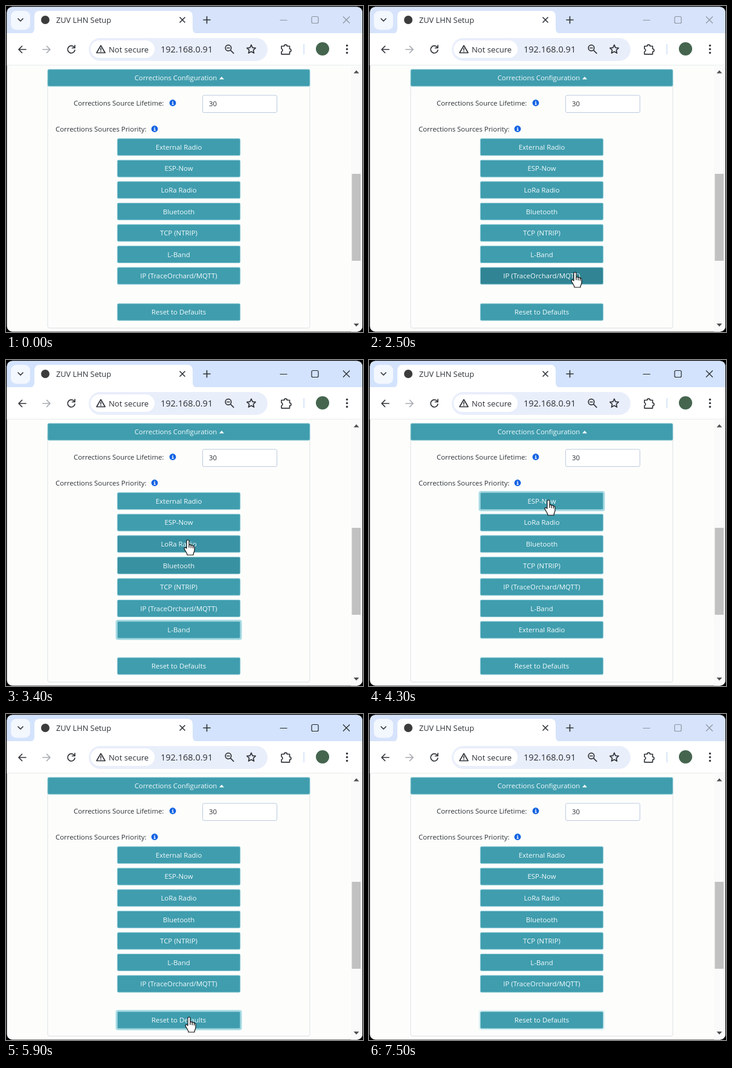
These frames come from a looping animation (591 px wide and 540 px high, 7600 ms). An HTML page:

```html
<!DOCTYPE html>
<html lang="en">
<head>
<meta charset="utf-8">
<title>Corrections priority</title>
<style>
  html, body { margin: 0; width: 100%; height: 100%; overflow: hidden; background: #000; }
  svg { display: block; width: 591px; height: 540px; }
  text { font-family: "Open Sans", "Noto Sans", sans-serif; font-size: 11.4px; fill: #2b3036; white-space: pre; }
  .btn text, .head text { fill: #f4fbfc; text-anchor: middle; }
  .btn rect.face, .head rect { stroke: #8fcbd6; stroke-width: 1; }
  .line { fill: none; stroke: #33373c; stroke-width: 1.7; stroke-linecap: round; stroke-linejoin: round; }
</style>
</head>
<body>
<svg viewBox="0 0 591 540" xmlns="http://www.w3.org/2000/svg">
  <defs><clipPath id="frame"><rect x="1.5" y="1.5" width="588.5" height="538" rx="9"/></clipPath></defs>
  <rect width="591" height="540" fill="#000"/>
  <g clip-path="url(#frame)">
    <rect width="591" height="540" fill="#fdfefc"/>

    <!-- tab strip -->
    <rect id="strip" width="591" height="46" fill="#d3e3fd"/>
    <rect x="8" y="8" width="32" height="31.5" rx="9" fill="#f3f7fe"/>
    <path class="line" d="M20 21l4 4 4-4" stroke-width="2"/>
    <path d="M38 46q9 0 9-9V17q0-9 9-9H300q9 0 9 9V37q0 9 9 9z" fill="#fff"/>
    <circle cx="65" cy="23" r="7" fill="#3c3c3c"/>
    <text x="83" y="28" style="font-size:12.8px">ZUV LHN Setup</text>
    <path class="line" d="M288 19l8 8m0-8l-8 8"/>
    <path class="line" d="M327 23h11m-5.500-5.500v11"/>
    <g id="controls" fill="none" stroke-width="1.2">
      <path d="M453.500 23.500h12"/>
      <rect x="506" y="17.500" width="11" height="11" rx="2"/>
      <path d="M558 17.500l11 11m0-11l-11 11"/>
    </g>

    <!-- toolbar -->
    <rect y="45" width="591" height="53" fill="#fff"/>
    <rect y="97.500" width="591" height="1" fill="#e6e9ec"/>
    <path class="line" d="M33 72H21m5.500-5.500L21 72l5.500 5.500"/>
    <path class="line" d="M61 72h12m-5.500-5.500L73 72l-5.500 5.500" style="stroke:#a7abb0"/>
    <path class="line" d="M113 68.500a6 6 0 1 0 1 4.500M114 65v4.500h-4.500"/>
    <rect x="137" y="53" width="296" height="38" rx="19" fill="#e9eefb"/>
    <rect x="140" y="57" width="106" height="29" rx="14.500" fill="#fff"/>
    <path class="line" d="M157 65.500l7 12h-14z"/>
    <path class="line" d="M157 70v3m0 2.300v.1" stroke-width="1.500"/>
    <text x="170" y="76.500" style="font-size:13.1px;font-weight:500">Not secure</text>
    <text x="256" y="77" style="font-size:14.5px">192.168.0.91</text>
    <circle class="line" cx="368" cy="69.500" r="4.800"/>
    <path class="line" d="M371.800 73.300l5 5M366 69.500h4"/>
    <path id="star" class="line"/>
    <path class="line" d="M456 66.500h4.500a2.400 2.400 0 0 1 4.800 0h4.200v4.500a2.400 2.400 0 0 1 0 4.800v4H456v-4a2.600 2.600 0 0 0 0-5z"/>
    <rect x="492.500" y="63" width="1.500" height="17" fill="#cfdff8"/>
    <circle cx="524" cy="71" r="11" fill="#45654f"/>
    <g fill="#33373c"><circle cx="564.500" cy="65.500" r="1.700"/><circle cx="564.500" cy="71.500" r="1.700"/><circle cx="564.500" cy="77.500" r="1.700"/></g>

    <!-- scrollbar -->
    <rect x="571" y="98.500" width="19" height="442" fill="#fafafa"/>
    <rect x="572.500" y="278" width="14.500" height="144" fill="#c1c1c1"/>
    <path d="M575.500 111.500h9l-4.500-5zM575.500 526h9l-4.500 5z" fill="#505050"/>

    <!-- settings card -->
    <rect x="69" y="120" width="434" height="413.500" rx="3" fill="none" stroke="#dbdfe1"/>
    <g class="head">
      <rect x="69" y="105" width="434" height="28" rx="2" fill="#3f9dae"/>
      <text x="281" y="123">Corrections Configuration</text>
      <path d="M353 121.500h8l-4-4.500z" fill="#f4fbfc"/>
    </g>
    <text x="112" y="165">Corrections Source Lifetime:</text>
    <text x="82" y="208">Corrections Sources Priority:</text>
    <g id="infos"></g>
    <rect x="325.500" y="148" width="123" height="28.500" rx="2.500" fill="#fff" stroke="#bccadd"/>
    <text x="336" y="166">30</text>
    <g id="buttons"></g>

    <g id="hand" stroke="#111" stroke-width="1.200" stroke-linejoin="round">
      <path fill="#fff" d="M-2 2C-2-.7 2-.7 2 2V9C2 7 5.300 7.300 5.300 9.500 5.500 8 8.500 8.200 8.500 10.500 8.800 9.300 11 9.800 11 12V17C11 20 9 21 9 25H-1C-1 22-3 20.500-5.500 15.500-7 12.800-4.500 11.500-2 14z"/>
      <path fill="none" d="M2 9v4M5.300 9.500v4M8.500 10.500v3.500"/>
    </g>
    <path id="arrow" d="M0 0V17l4-3.700 2.700 6.200 2.700-1.200-2.700-6H12z" fill="#fff" stroke="#111"/>
  </g>
</svg>
<script>
const LOOP = 7600, STEP = 100;
const $ = id => document.getElementById(id);
const NS = "http://www.w3.org/2000/svg";

function add(parent, tag, attrs, text) {
  const el = document.createElementNS(NS, tag);
  for (const key in attrs) el.setAttribute(key, attrs[key]);
  if (text) el.textContent = text;
  return parent.appendChild(el);
}

// Static details
$("star").setAttribute("d", "M" + Array.from({ length: 10 }, (_, i) => {
  const r = i % 2 ? 3.6 : 7.6, a = (i / 5 - 0.5) * Math.PI;
  return (406 + r * Math.cos(a)).toFixed(1) + " " + (72 + r * Math.sin(a)).toFixed(1);
}).join("L") + "z");

for (const [x, y] of [[276, 160.5], [246, 203.5]]) {
  add($("infos"), "circle", { cx: x, cy: y, r: 5.4, fill: "#0f62e2" });
  add($("infos"), "path", { d: `M${x - 1.3} ${y - 0.6}h1.5v3.3m-1.7 0h3.2M${x} ${y - 3.3}v1.3`, fill: "none", stroke: "#fff", "stroke-width": 1.3 });
}

// Buttons: seven priority slots, then the reset button
const RESET = 7;
const slotY = i => i === RESET ? 507 : 233.7 + 35.55 * i;
const slots = Array.from({ length: 8 }, (_, i) => {
  const g = add($("buttons"), "g", { class: "btn" }), y = slotY(i);
  const glow = add(g, "rect", { x: 181.5, y: y - 16.8, width: 209, height: 33.6, rx: 4, fill: "#a9dbe4" });
  const face = add(g, "rect", { class: "face", x: 184.3, y: y - 14, width: 203.4, height: 28, rx: 2 });
  const label = add(g, "text", { x: 286, y: y + 4.2 }, "Reset to Defaults");
  return { glow, face, label };
});

const START = ["External Radio", "ESP-Now", "LoRa Radio", "Bluetooth", "TCP (NTRIP)", "L-Band", "IP (TraceOrchard/MQTT)"];
const raised = [...START.slice(0, 5), START[6], START[5]];
const rotated = [...raised.slice(1), raised[0]];

const ORDERS = [[0, START], [2800, raised], [4200, rotated], [5800, START]];
const FOCUS = [[0, -1], [2700, 6], [4100, 0], [5700, RESET]];
const at = (list, t) => list.filter(e => e[0] <= t).pop()[1];

// Pointer hot spot: time, x, y
const PATH = [
  [1600, 473, 522], [1800, 455, 478], [1900, 438, 460], [2000, 412, 452], [2100, 380, 447],
  [2300, 337, 441], [2400, 342, 442], [2500, 341, 441], [3000, 341, 441],
  [3100, 337, 428], [3300, 313, 343], [3400, 301, 298], [3500, 299, 270], [3800, 301, 243], [3900, 298, 235],
  [4100, 297, 232], [4800, 297, 232], [4900, 300, 250], [5100, 327, 430], [5200, 322, 468],
  [5300, 312, 490], [5500, 303, 502], [6200, 303, 502], [6300, 325, 508], [6700, 522, 545]
];

function pointer(t) {
  const i = PATH.findIndex(p => p[0] > t);
  if (i < 1) return null;
  const [t0, x0, y0] = PATH[i - 1], [t1, x1, y1] = PATH[i];
  const k = (t - t0) / (t1 - t0);
  return { x: x0 + (x1 - x0) * k, y: y0 + (y1 - y0) * k };
}

function hovers(i, t) {
  const p = pointer(t);
  return p && p.x > 184 && p.x < 388 && Math.abs(p.y - slotY(i)) < 16;
}

// Short fade of the hover colour
function hoverLevel(i, t) {
  let sum = 0;
  for (let lag = 0; lag < 150; lag += 15) sum += hovers(i, t - lag) ? 1 : 0;
  return sum / 10;
}

const mix = (a, b, k) => `rgb(${a.map((v, i) => Math.round(v + (b[i] - v) * k))})`;

function draw(t) {
  const active = t >= 2700 && t < 7500;
  const order = at(ORDERS, t), focus = at(FOCUS, t);

  $("strip").setAttribute("fill", active ? "#d3e3fd" : "#d6e3fb");
  $("controls").setAttribute("stroke", active ? "#23272c" : "#8d95a1");

  slots.forEach((s, i) => {
    const focused = i === focus;
    if (i !== RESET && s.label.textContent !== order[i]) s.label.textContent = order[i];
    s.glow.setAttribute("opacity", focused ? (active ? 1 : 0.3) : 0);
    s.face.setAttribute("fill", mix([63, 157, 174], [48, 132, 148], focused ? 0 : hoverLevel(i, t)));
  });

  const p = pointer(t);
  const onButton = p && p.x > 184 && p.x < 388 && (p.y < 462 || p.y > 492 && p.y < 522);
  for (const [id, shown] of [["hand", onButton], ["arrow", p && !onButton]]) {
    $(id).style.display = shown ? "" : "none";
    if (shown) $(id).setAttribute("transform", `translate(${p.x.toFixed(1)} ${p.y.toFixed(1)})`);
  }
}

const began = performance.now();
function tick() {
  const t = (performance.now() - began) % LOOP;
  draw(Math.floor(t / STEP) * STEP);
  requestAnimationFrame(tick);
}
tick();
</script>
</body>
</html>
```
